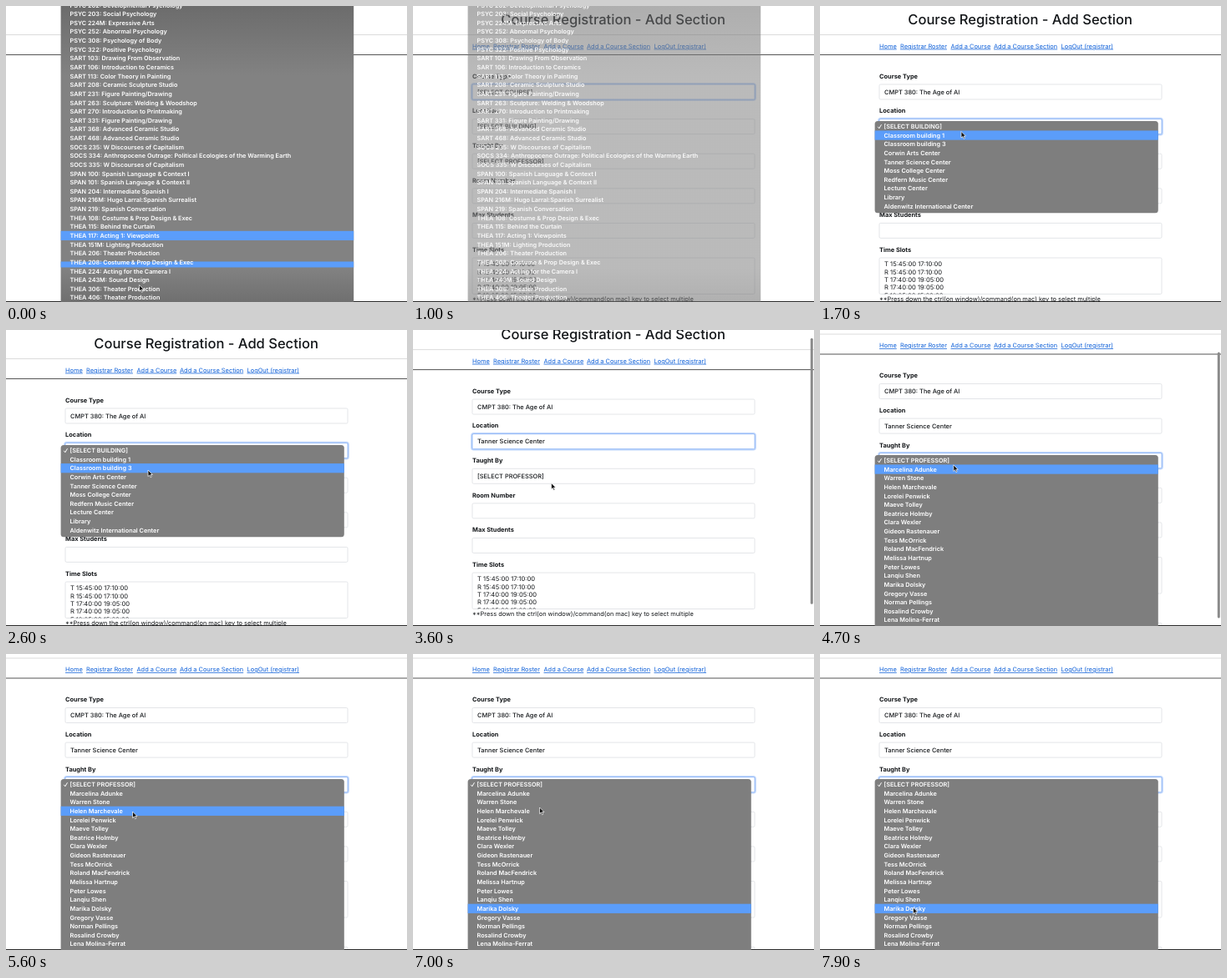
Animation, 480 px wide and 355 px high, one loop 8000 ms. Source, as an HTML page:

```html
<!DOCTYPE html>
<html lang="en">
<head>
<meta charset="utf-8">
<title>Course Registration</title>
<style>
html, body { margin: 0; width: 100%; height: 100%; overflow: hidden; background: #fff; }
svg { display: block; width: 480px; height: 355px; }
text { font: 400 7.42px Inter, "Open Sans", sans-serif; fill: #14171a; white-space: pre; text-rendering: geometricPrecision; }
.title { font-weight: 500; font-size: 16.55px; text-anchor: middle; }
.label { font-weight: 700; }
.value { font-weight: 500; }
.link { fill: #0d5fd8; text-decoration: underline; }
.slot { font-size: 7.6px; }
.menu text { font-weight: 600; font-size: 7.28px; fill: #fff; }
</style>
</head>
<body>
<svg id="stage" viewBox="0 0 480 355">
  <defs>
    <linearGradient id="shade" x1="0" y1="0" x2="0" y2="1">
      <stop offset="0" stop-color="#6a6a6a"/>
      <stop offset=".25" stop-color="#828282"/>
      <stop offset=".88" stop-color="#828282"/>
      <stop offset="1" stop-color="#6e6e6e"/>
    </linearGradient>
    <clipPath id="slots"><rect x="71" y="302" width="338" height="43.5"/></clipPath>
  </defs>
</svg>
<script>
const LOOP = 8000, STEP = 100, PITCH = 10.635, FIELD_PITCH = 41.6;
const stage = document.getElementById("stage");

function add(parent, tag, attrs = {}, text) {
  const el = document.createElementNS("http://www.w3.org/2000/svg", tag);
  for (const k in attrs) el.setAttribute(k, attrs[k]);
  if (text !== undefined) el.textContent = text;
  parent.appendChild(el);
  return el;
}
// y is the vertical middle of the line
const label = (parent, x, y, text, cls = "") =>
  add(parent, "text", { x, y: y + 2.6, class: cls }, text);
const show = (el, on) => el.setAttribute("visibility", on ? "visible" : "hidden");

// ---- page ----
const page = add(stage, "g");
add(page, "text", { x: 239.6, y: 21.7, class: "title" }, "Course Registration - Add Section");
add(page, "rect", { x: 0, y: 34, width: 480, height: 1, fill: "#dcdcdc" });
add(page, "rect", { x: 0, y: 58, width: 480, height: 1, fill: "#555" });
[[71, "Home"], [96, "Registrar Roster"], [156.5, "Add a Course"],
 [208, "Add a Course Section"], [288.5, "LogOut (registrar)"]]
  .forEach(([x, s]) => label(page, x, 48, s, "link"));

function box(y, h) {
  return add(page, "rect", { x: 71, y, width: 338, height: h, rx: 1.5, fill: "#fff", stroke: "#dcdfe2", "stroke-width": .8 });
}
const fields = ["Course Type", "Location", "Taught By", "Room Number", "Max Students"].map((name, i) => {
  const y = 84.2 + i * FIELD_PITCH;
  label(page, 71, y, name, "label");
  const ring = add(page, "rect", { x: 70.2, y: y + 9, width: 339.6, height: 19.6, rx: 2.5,
    fill: "none", stroke: "#bcd4fb", "stroke-width": 2 });
  const frame = box(y + 9.8, 18);
  return { ring, frame, value: label(page, 77, y + 18.9, "", "value") };
});
label(page, 71, 292.3, "Time Slots", "label");
box(302, 43.5);
const slots = add(page, "g", { "clip-path": "url(#slots)" });
["T 15:45:00 17:10:00", "R 15:45:00 17:10:00", "T 17:40:00 19:05:00", "R 17:40:00 19:05:00", "F 12:35:00 15:30:00"]
  .forEach((s, i) => label(slots, 77, 309.6 + i * 9.35, s, "slot"));
label(page, 71, 351.6, "**Press down the ctrl(on window)/command(on mac) key to select multiple");
label(page, 71, 371, "Mod Type", "label");
box(380.8, 18);

add(stage, "rect", { x: 0, y: 354, width: 480, height: 1, fill: "#2a2a2a" });
const bar = add(stage, "rect", { x: 475.8, width: 3, height: 319, rx: 1.5, fill: "#8a8a8a" });

// ---- menus ----
function makeMenu(rows, top, width, fill, checked) {
  const g = add(stage, "g", { class: "menu" });
  const x = 65.6, first = top + 1.1;
  const back = add(g, "rect", { x, y: top, width, height: rows.length * PITCH + 4, rx: 3.5, fill });
  const mark = add(g, "rect", { x, width, height: PITCH + .6, fill: "#5b9dfa" });
  const front = add(g, "g");
  if (checked) add(front, "path", { d: `M69.3 ${top + 6.8}l1.5 2 2.7-4.6`, fill: "none", stroke: "#fff", "stroke-width": 1 });
  rows.forEach((s, i) => label(front, 76.5, first + (i + .5) * PITCH, s));
  return {
    g, mark,
    rowAt(y) { const i = Math.floor((y - first) / PITCH); return i < rows.length ? i : -1; },
    pick(i) {
      show(mark, i >= 0);
      mark.setAttribute("y", first + i * PITCH - .3);
    },
    // the lettering outlasts the backdrop
    fade(a) {
      g.style.display = a ? "" : "none";
      back.setAttribute("opacity", a);
      front.setAttribute("opacity", Math.min(1, a * 1.7));
    }
  };
}

const courses = makeMenu(`PSYC 202: Developmental Psychology
PSYC 203: Social Psychology
PSYC 224M: Expressive Arts
PSYC 252: Abnormal Psychology
PSYC 308: Psychology of Body
PSYC 322: Positive Psychology
SART 103: Drawing From Observation
SART 106: Introduction to Ceramics
SART 113: Color Theory in Painting
SART 208: Ceramic Sculpture Studio
SART 231: Figure Painting/Drawing
SART 263: Sculpture: Welding & Woodshop
SART 270: Introduction to Printmaking
SART 331: Figure Painting/Drawing
SART 368: Advanced Ceramic Studio
SART 468: Advanced Ceramic Studio
SOCS 235: W Discourses of Capitalism
SOCS 334: Anthropocene Outrage: Political Ecologies of the Warming Earth
SOCS 335: W Discourses of Capitalism
SPAN 100: Spanish Language & Context I
SPAN 101: Spanish Language & Context II
SPAN 204: Intermediate Spanish I
SPAN 216M: Hugo Larral:Spanish Surrealist
SPAN 219: Spanish Conversation
THEA 108: Costume & Prop Design & Exec
THEA 115: Behind the Curtain
THEA 117: Acting 1: Viewpoints
THEA 151M: Lighting Production
THEA 206: Theater Production
THEA 208: Costume & Prop Design & Exec
THEA 224: Acting for the Camera I
THEA 243M: Sound Design
THEA 306: Theater Production
THEA 406: Theater Production`.split("\n"), -7.5, 350.6, "url(#shade)");
const halfMark = add(courses.g, "rect", { x: 65.6, y: 306.5, width: 350.6, height: 7, fill: "#5b9dfa" });
courses.g.insertBefore(halfMark, courses.mark);

const PLACE = "Tanner Science Center";
const places = makeMenu(["[SELECT BUILDING]", "Classroom building 1", "Classroom building 3", "Corwin Arts Center",
  PLACE, "Moss College Center", "Redfern Music Center", "Lecture Center", "Library",
  "Aldenwitz International Center"], 138, 339.2, "#7e7e7e", true);

const teachers = makeMenu(["[SELECT PROFESSOR]", "Marcelina Adunke", "Warren Stone", "Helen Marchevale",
  "Lorelei Penwick", "Maeve Tolley", "Beatrice Holmby", "Clara Wexler", "Gideon Rastenauer", "Tess McOrrick",
  "Roland MacFendrick", "Melissa Hartnup", "Peter Lowes", "Lanqiu Shen", "Marika Dolsky", "Gregory Vasse",
  "Norman Pellings", "Rosalind Crowby", "Lena Molina-Ferrat", ""], 150, 339.2, "#7e7e7e", true);

// ---- pointer ----
const pointer = add(stage, "path", { d: "M0 0V7.6L1.8 6 3 8.8 4.3 8.2 3.1 5.5H5.5Z",
  fill: "#111", stroke: "#fff", "stroke-width": .7, "stroke-linejoin": "round" });
const path = [
  [0, 159.5, 334.5], [100, 153, 358], [600, 153, 358], [700, 152, 352.5], [800, 152, 358], [1100, 152, 358],
  [1200, 168, 145], [1500, 168, 145], [1900, 170, 156], [2300, 171, 165], [2600, 170, 168],
  [2900, 169, 175], [3200, 165.5, 183.5], [4100, 165.5, 183.5], [4400, 162, 157], [4600, 161, 158],
  [5100, 155, 177], [5600, 151.5, 189], [5800, 151.5, 191], [6000, 151.5, 184], [7100, 151.5, 184], [7900, 111.5, 304]
];
function along(t) {
  const i = path.findIndex(p => p[0] > t);
  if (i < 0) return path[path.length - 1].slice(1);
  const [a, b] = [path[i - 1], path[i]];
  const u = (t - a[0]) / (b[0] - a[0]);
  return [a[1] + (b[1] - a[1]) * u, a[2] + (b[2] - a[2]) * u];
}

// opaque between open and close, then gone in two steps
const menuAlpha = (t, open, close) =>
  t < open || t >= close + 200 ? 0 : t < close ? 1 : t < close + 100 ? .55 : .2;

function draw(time) {
  const t = Math.floor(time % LOOP / STEP) * STEP;
  const [x, y] = along(t);
  pointer.setAttribute("transform", `translate(${x} ${y})`);

  const u = Math.min(1, Math.max(0, (t - 3500) / 700));
  const scroll = 29.5 * (1 - (1 - u) ** 3);
  page.setAttribute("transform", `translate(0 ${-scroll})`);
  bar.setAttribute("y", scroll * .9);
  show(bar, t >= 3600);
  bar.setAttribute("opacity", Math.min(1, Math.max(0, (5000 - t) / 300)));

  const focus = t < 1500 ? 0 : t < 4500 ? 1 : 2;
  const values = [t < 1200 ? "[SELECT COURSE]" : "CMPT 380: The Age of AI",
    t < 3500 ? "[SELECT BUILDING]" : PLACE, "[SELECT PROFESSOR]", "", ""];
  fields.forEach((f, i) => {
    show(f.ring, i === focus);
    f.frame.setAttribute("stroke", i === focus ? "#86b0f5" : "#dcdfe2");
    f.value.textContent = values[i];
  });

  courses.fade(menuAlpha(t, 0, 1000));
  courses.pick(t < 100 ? 26 : -1);
  show(halfMark, t < 100);
  places.fade(menuAlpha(t, 1500, 3300));
  places.pick(t < 3300 ? places.rowAt(y) : -1);
  teachers.fade(t >= 4500 ? 1 : 0);
  // typed letters move the choice until the pointer moves again
  const typed = t >= 6300 && t < 7200;
  teachers.pick(typed ? (t < 6600 ? 5 : 14) : teachers.rowAt(y));
}

const start = performance.now();
function tick() {
  draw(performance.now() - start);
  requestAnimationFrame(tick);
}
draw(0);
requestAnimationFrame(tick);
</script>
</body>
</html>
```
